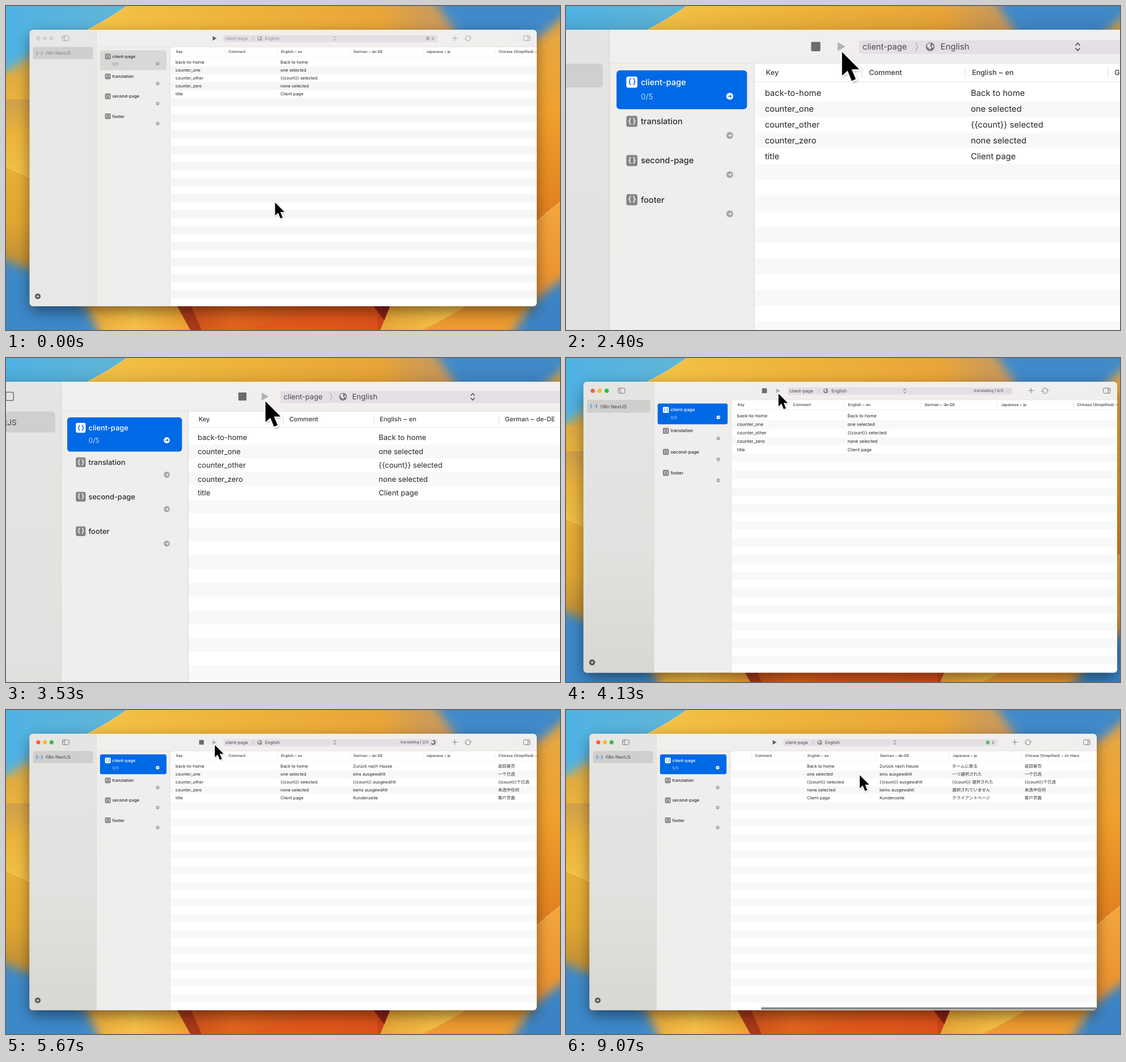
These frames come from a looping animation (977 by 573 pixels, 9.33 s). An HTML page:

```html
<!DOCTYPE html>
<html lang="en">
<head>
<meta charset="utf-8">
<title>Localization editor</title>
<style>
html, body { margin: 0; width: 100%; height: 100%; overflow: hidden; }
svg {
  display: block; width: 100%; height: 100%;
  font-family: Inter, "Noto Sans CJK SC", "Noto Sans CJK JP", "Noto Sans CJK", sans-serif;
  text-rendering: geometricPrecision;
  --sel: #d9d8d6; --name: #2b2b2b; --count: #858585; --icon: #868686; --brace: #fff;
  --dot: #a3a3a3; --arrow: #dedddb; --tool: #929092; --project: #7c7c7c; --mark: #6da99f;
  --red: #d2d0cf; --amber: #d2d0cf; --green: #d2d0cf; --stripe: #f4f5f5; --glyph: #9b9a9a;
}
svg.on {
  --sel: #0069e5; --name: #fff; --count: #b9d8ff; --icon: #fff; --brace: #0069e5;
  --dot: #fff; --arrow: #0069e5; --tool: #4b494b; --project: #414141; --mark: #2687ee;
  --red: #ff5b51; --amber: #f9b92d; --green: #2bc23f; --stripe: #f7f8f8; --glyph: #737272;
}
text { dominant-baseline: central; white-space: pre; }
</style>
</head>
<body>
<svg id="stage" viewBox="0 0 977 573" preserveAspectRatio="none">
  <defs>
    <linearGradient id="top"><stop offset=".15" stop-color="#f5c247"/><stop offset=".4" stop-color="#efb43a"/><stop offset=".68" stop-color="#e9a439"/><stop offset=".76" stop-color="#cf9a55"/></linearGradient>
    <linearGradient id="sky"><stop offset="0" stop-color="#4fb2e4"/><stop offset="1" stop-color="#62b5d6"/></linearGradient>
    <linearGradient id="leftA" x2="0" y2="1"><stop offset="0" stop-color="#cfa04b"/><stop offset=".4" stop-color="#eab33c"/><stop offset="1" stop-color="#f3c74a"/></linearGradient>
    <linearGradient id="leftB" x2="0" y2="1"><stop offset="0" stop-color="#e9ae37"/><stop offset=".5" stop-color="#dfa633"/><stop offset="1" stop-color="#b88735"/></linearGradient>
    <linearGradient id="rightA" x2="0" y2="1"><stop offset="0" stop-color="#e8a842"/><stop offset=".4" stop-color="#f0a02d"/><stop offset="1" stop-color="#df7a1c"/></linearGradient>
    <linearGradient id="rightB" x2="0" y2="1"><stop offset="0" stop-color="#f3a63c"/><stop offset="1" stop-color="#e4862a"/></linearGradient>
    <linearGradient id="redBand"><stop offset="0" stop-color="#c34a1b"/><stop offset=".25" stop-color="#e0641d"/><stop offset=".7" stop-color="#dc521b"/><stop offset="1" stop-color="#c63d18"/></linearGradient>
    <linearGradient id="goldBand"><stop offset="0" stop-color="#e9a638"/><stop offset=".5" stop-color="#f4c046"/><stop offset="1" stop-color="#eda132"/></linearGradient>
    <linearGradient id="side" x2="0" y2="1"><stop offset="0" stop-color="#e5e5e3"/><stop offset=".6" stop-color="#e1e1df"/><stop offset="1" stop-color="#d8d7d2"/></linearGradient>
    <filter id="soft" x="-50%" y="-50%" width="200%" height="200%"><feGaussianBlur stdDeviation="9"/></filter>
    <filter id="shade" x="-20%" y="-20%" width="140%" height="140%"><feGaussianBlur stdDeviation="13"/></filter>
    <filter id="tipShade" x="-50%" y="-50%" width="220%" height="220%"><feGaussianBlur stdDeviation="1.4"/></filter>
    <clipPath id="frame"><rect x="41.5" y="42" width="894.5" height="489" rx="6"/></clipPath>
    <clipPath id="table"><rect x="289.5" y="72" width="646.5" height="459"/></clipPath>
  </defs>
  <g id="wall"></g>
  <g id="zoom">
    <rect x="43" y="52" width="891" height="487" rx="8" fill="#000" opacity=".48" filter="url(#shade)"/>
    <g id="win" clip-path="url(#frame)"></g>
    <g id="cursor">
      <path d="M1 2V25L6.5 20 10.5 30 15 28 10.5 18.5H18Z" opacity=".35" filter="url(#tipShade)"/>
      <path d="M0 0V23L5.4 18.2 9.4 28 13.3 26.3 9.3 16.8H16.6Z" stroke="#fff" stroke-width="2.8" stroke-linejoin="round" paint-order="stroke"/>
    </g>
  </g>
</svg>
<script>
const NS = 'http://www.w3.org/2000/svg';
const LOOP = 9330;
const stage = document.getElementById('stage');
const wall = document.getElementById('wall');
const win = document.getElementById('win');
const zoom = document.getElementById('zoom');
const cursor = document.getElementById('cursor');

function add(parent, tag, attrs, content) {
  const el = document.createElementNS(NS, tag);
  for (const k in attrs) el.setAttribute(k, attrs[k]);
  if (content !== undefined) el.textContent = content;
  parent.appendChild(el);
  return el;
}
const rect = (p, x, y, width, height, fill, rx = 0) => add(p, 'rect', { x, y, width, height, fill, rx });
const circle = (p, cx, cy, r, fill) => add(p, 'circle', { cx, cy, r, fill });
const shape = (p, d, fill, more) => add(p, 'path', { d, fill, ...more });
const line = (p, d, stroke, width = 1) => add(p, 'path', {
  d, stroke, fill: 'none', 'stroke-width': width, 'stroke-linecap': 'round', 'stroke-linejoin': 'round' });
const label = (p, x, y, size, fill, str, more) => add(p, 'text', { x, y, 'font-size': size, fill, ...more }, str);
const group = (p, more) => add(p, 'g', more);
const show = (el, on) => el.setAttribute('visibility', on ? 'visible' : 'hidden');

function buildWall() {
  const soft = { filter: 'url(#soft)' };
  rect(wall, 0, 0, 977, 573, '#e9a638');
  rect(wall, 0, 0, 977, 70, 'url(#top)');
  shape(wall, 'M742 -30H1010V60H802Q775 20 742 -30Z', '#3f8aca', soft);
  shape(wall, 'M0 0H213Q180 24 143 42V120H0Z', 'url(#sky)');
  line(wall, 'M213 0Q180 24 143 42', '#f5d78a', 1);
  shape(wall, 'M-30 135L70 72V310H-30Z', 'url(#leftA)', soft);
  rect(wall, 0, 165, 60, 160, 'url(#leftA)');
  shape(wall, 'M0 285Q22 293 60 313V480H0Z', 'url(#leftB)');
  line(wall, 'M0 285Q22 293 60 313', '#f6cf6a', 1);
  shape(wall, 'M135 500H320V600H172Z', 'url(#goldBand)');
  shape(wall, 'M-30 438L60 474 140 528 176 605H-30Z', '#3d88c8', soft);
  shape(wall, 'M296 500H700L660 573H325Z', 'url(#redBand)');
  shape(wall, 'M296 520L325 573H345L322 520Z', '#a8391a');
  shape(wall, 'M430 573Q490 548 570 525H655V573Z', '#e2571b', { opacity: .7 });
  shape(wall, 'M640 520L668 557 684 520Z', '#8e1f14');
  shape(wall, 'M684 515L660 573H860L890 515Z', 'url(#goldBand)');
  shape(wall, 'M735 573Q790 545 830 520H910V573Z', '#ec9a31');
  shape(wall, 'M920 75L1010 -5V380H920Z', '#e6a343', soft);
  shape(wall, 'M930 80L977 50V400H930Z', 'url(#rightA)');
  shape(wall, 'M977 347Q955 363 925 392V573H977Z', 'url(#rightB)');
  line(wall, 'M977 347Q955 363 925 392', '#f9c873', 1);
  shape(wall, 'M1010 470Q960 492 925 530L880 600H1010Z', '#3b83c4', soft);
}

function panelIcon(x, flip) {
  add(win, 'rect', { x, y: 52.7, width: 11.4, height: 8.6, rx: 1.6, fill: 'none', stroke: 'var(--glyph)', 'stroke-width': .9 });
  const bar = flip ? x + 7.8 : x + 3.6;
  line(win, `M${bar} 53V61`, 'var(--glyph)', .8);
  const tick = flip ? x + 9 : x + 1.4;
  line(win, `M${tick} 55H${tick + 1}M${tick} 57H${tick + 1}`, 'var(--glyph)', .6);
}

function buildSidebar() {
  rect(win, 41, 42, 119, 489, '#e8e7e6');
  const tint = rect(win, 41, 42, 119, 489, 'url(#side)');
  rect(win, 159, 42, .8, 489, '#d8d7d5');
  ['red', 'amber', 'green'].forEach((c, i) => circle(win, 57 + i * 11.7, 57.2, 3.6, `var(--${c})`));
  panelIcon(99.6, false);
  rect(win, 47.5, 72.5, 106, 21.5, '#d0cfcd', 3);
  label(win, 58.8, 82.6, 8, 'var(--mark)', '{··}', { 'text-anchor': 'middle', 'font-weight': 700 });
  label(win, 70, 83.4, 7.9, 'var(--project)', 'I18n NextJS');
  circle(win, 56, 513.5, 5, '#545453');
  line(win, 'M53.8 513.5H58.2M56 511.3V515.7', '#fff', 1);
  return tint;
}

function fileItem(name, i) {
  const y = 89.2 + i * 35.3;
  const c = (active, plain) => i ? plain : `var(--${active})`;
  if (!i) rect(win, 165.8, 78.5, 117.2, 35, 'var(--sel)', 3);
  rect(win, 174.6, y - 5, 10, 10, c('icon', '#858584'), 1.8);
  label(win, 179.6, y - .2, 6.6, c('brace', '#fff'), '{ }', { 'text-anchor': 'middle', 'font-weight': 600, 'letter-spacing': -.3 });
  label(win, 187.6, y, 7.45, c('name', '#2b2b2b'), name, { 'font-weight': 450 });
  circle(win, 267.5, y + 12.7, 3.1, c('dot', '#a6a5a4'));
  line(win, `M266 ${y + 12.7}H269M268 ${y + 11.7}L269 ${y + 12.7} 268 ${y + 13.7}`, c('arrow', '#efeeec'), .65);
}

function buildToolbar() {
  rect(win, 160, 42, 776, 30.5, '#f0efee');
  rect(win, 160, 72, 776, .6, '#e2e1e0');
  const hover = rect(win, 358.5, 50, 19, 14, '#dfdedd', 2.5);
  const stop = rect(win, 340.6, 53, 8.3, 8.3, '#6d6c6c', .8);
  const play = shape(win, 'M364.4 53.2L371.4 57.2 364.4 61.2Z', '#5f5e5e', { stroke: 'none' });
  rect(win, 383.5, 51.5, 377.5, 12.3, '#e5dee5', 2.5);
  label(win, 386.8, 57.4, 7.4, 'var(--tool)', 'client-page');
  line(win, 'M434.4 53.6L436.3 57.4 434.4 61.2', '#aaa6aa', .6);
  circle(win, 447.5, 57.3, 3.9, 'var(--glyph)');
  shape(win, 'M445 55Q447 53.6 448.2 54.4L447.2 56.4 448.6 57.6 447.4 60.2 446 58.2 444.6 57.4ZM449.2 55.2L450.7 57 449.8 58.8 448.9 57Z', '#e9e3e9');
  label(win, 456.8, 57.4, 7.6, 'var(--tool)', 'English');
  line(win, 'M578.2 56L580 54 581.8 56M578.2 58.8L580 60.8 581.8 58.8', 'var(--tool)', .85);
  line(win, 'M787.3 57H795.7M791.5 52.8V61.2', 'var(--glyph)', .9);
  line(win, 'M810.4 56.2A4.5 4.5 0 0 1 818.8 54.8M819.2 58A4.5 4.5 0 0 1 810.8 59.4M817.4 56.2H820.8M808.8 58H812.2', 'var(--glyph)', .95);
  rect(win, 895.7, 49, .6, 16, '#dddcdb');
  panelIcon(912.7, true);
  return { hover, stop, play };
}

function buildStatus() {
  const busy = group(win);
  const text = label(busy, 745, 57.4, 6.5, '#5b565b', '', { 'text-anchor': 'end', 'font-weight': 500 });
  const ringAttrs = { cx: 753.2, cy: 57.3, r: 3.3, fill: 'none', 'stroke-width': 1.9 };
  add(busy, 'circle', { ...ringAttrs, stroke: '#d8d0d8' });
  const ring = add(busy, 'circle', { ...ringAttrs, stroke: '#5b575b', pathLength: 1, transform: 'rotate(-90 753.2 57.3)' });
  const idle = group(win);
  const badge = circle(idle, 744, 57.4, 3.1, '#a9a5a9');
  line(idle, 'M742.6 57.5L743.7 58.6 745.5 56.2', '#f3eff3', .8);
  const total = label(idle, 750.8, 57.5, 6.5, '#8b878b', '', { 'font-weight': 500 });
  return { busy, text, ring, idle, badge, total };
}

const COLUMNS = [
  ['Key', 300, ['back-to-home', 'counter_one', 'counter_other', 'counter_zero', 'title']],
  ['Comment', 392.5, []],
  ['English ~ en', 485, ['Back to home', 'one selected', '{{count}} selected', 'none selected', 'Client page']],
  ['German ~ de-DE', 613, ['Zurück nach Hause', 'eins ausgewählt', '{{count}} ausgewählt', 'keins ausgewählt', 'Kundenseite'], 'de'],
  ['Japanese ~ ja', 741, ['ホームに戻る', '一つ選択された', '{{count}} 選択された', '選択されていません', 'クライアントページ'], 'ja'],
  ['Chinese (Simplified) ~ zh-Hans', 868.7, ['返回首页', '一个已选', '{{count}}个已选', '未选中任何', '客户页面'], 'zh-Hans']
];

function buildTable() {
  const ROW = 14.15, FIRST = 99.3;
  const box = group(win, { 'clip-path': 'url(#table)' });
  rect(box, 289, 72.5, 647, 460, '#fff');
  for (let i = 1; i < 31; i += 2) rect(box, 289, FIRST + (i - .5) * ROW, 647, ROW, 'var(--stripe)');
  rect(box, 289, 88.6, 647, .5, '#e6e6e6');
  const moving = group(box);
  const cells = {};
  COLUMNS.forEach(([head, x, rows, lang], i) => {
    if (i) rect(moving, x - 6.3, 76, .6, 9.5, '#dedede');
    label(moving, x, 80.8, 6.4, '#3a3a3a', head, { 'font-weight': 450 });
    const col = group(moving, lang ? { lang } : {});
    if (lang) cells[lang] = col;
    rows.forEach((s, r) => label(col, x - 1, FIRST + r * ROW, 7.5, '#262626', s));
  });
  rect(win, 289, 72, .7, 459, '#dcdbda');
  const bar = rect(win, 289, 525.8, 592, 4.2, '#8b8b8b', 2.1);
  return { moving, cells, bar };
}

buildWall();
const tint = buildSidebar();
rect(win, 159.8, 42, 130, 489, '#efeeec');
const tools = buildToolbar();
['client-page', 'translation', 'second-page', 'footer'].forEach(fileItem);
const progress = label(win, 187.6, 102, 7, 'var(--count)', '0/5');
const status = buildStatus();
const table = buildTable();

const CLICK = 1930, DONE = 7330, SCROLL = 8330;
const ARRIVALS = { de: 4600, 'zh-Hans': 5400, ja: 6800 };
const span = (t, a, b) => Math.min(1, Math.max(0, (t - a) / (b - a)));
const inOut = u => u < .5 ? 4 * u ** 3 : 1 - 4 * (1 - u) ** 3;
const mix = (a, b, u) => a + (b - a) * u;

// Critically damped spring from 0 to 1.
function spring(t, start) {
  const u = Math.max(0, t - start) * .0061;
  return 1 - (1 + u) * Math.exp(-u);
}

function render(t) {
  const active = t >= CLICK, busy = active && t < DONE, done = t >= DONE;
  stage.setAttribute('class', active ? 'on' : '');
  show(tint, active);

  const s = 1 + spring(t, 1560) - spring(t, 3363);
  zoom.setAttribute('transform', `translate(245.4 42) scale(${s}) translate(-245.4 -42)`);

  const go = inOut(span(t, 870, 1850)), leave = inOut(span(t, 7800, 8470));
  const x = mix(mix(474.5, 368.3, go), 518, leave);
  const y = mix(mix(347.5, 62, go), 115.3, leave);
  const size = mix(mix(1, .93, go), 1, leave);
  cursor.setAttribute('transform', `translate(${x} ${y}) scale(${size})`);

  show(tools.hover, t >= 1600 && t < CLICK);
  show(tools.stop, busy);
  tools.play.setAttribute('fill', busy ? '#b3b2b2' : '#5f5e5e');
  progress.textContent = done ? '5/5' : '0/5';

  let count = 0, filled = 0;
  for (const lang in ARRIVALS) {
    const at = ARRIVALS[lang];
    show(table.cells[lang], t >= at);
    if (t >= at) count++;
    filled += inOut(span(t, at, at + 270)) / 3;
  }
  show(status.busy, busy);
  show(status.idle, !busy);
  status.text.textContent = `translating | ${count}/3`;
  status.ring.setAttribute('stroke-dasharray', `${filled} 2`);
  status.badge.setAttribute('fill', done ? '#35b845' : '#a9a5a9');
  status.total.textContent = done ? '3' : '8';
  status.total.setAttribute('fill', done ? '#5b565b' : '#8b878b');

  const scroll = 59 * inOut(span(t, SCROLL, 8900));
  table.moving.setAttribute('transform', `translate(${-scroll} 0)`);
  table.bar.setAttribute('x', 289 + scroll * 55 / 59);
  show(table.bar, t >= SCROLL);
}

const began = performance.now();
function tick() {
  render((performance.now() - began) % LOOP);
  requestAnimationFrame(tick);
}
tick();
</script>
</body>
</html>
```
